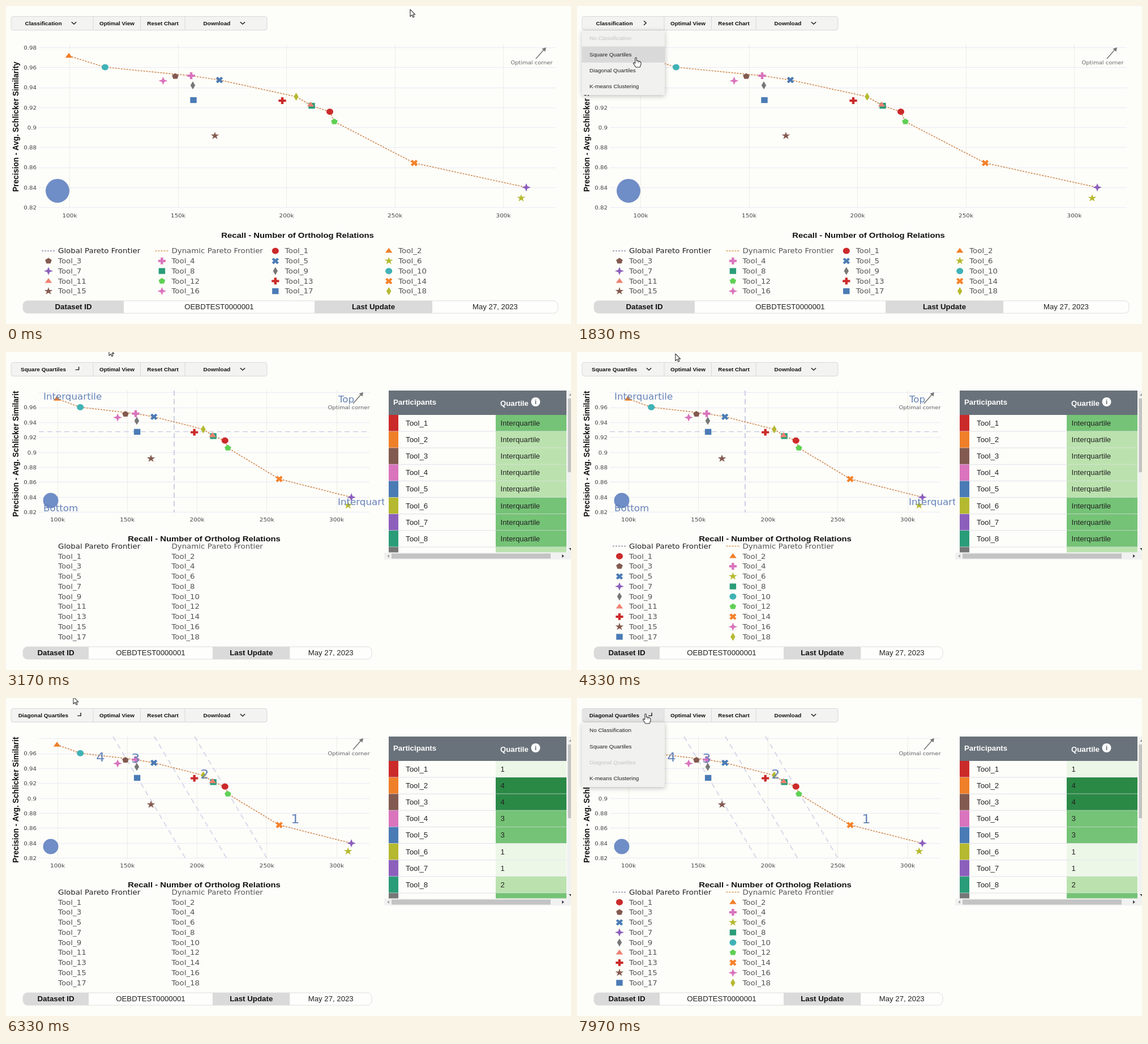
An HTML page with a canvas for the animation above (8 s loop, 998 px wide and 561 px high).

```html
<!DOCTYPE html>
<html lang="en">
<head>
<meta charset="utf-8">
<title>Benchmark chart classification</title>
<style>
html, body { margin: 0; width: 100%; height: 100%; overflow: hidden; background: #fdfdf9; }
canvas { display: block; width: 100vw; height: 100vh; }
</style>
</head>
<body>
<canvas id="stage" width="998" height="561"></canvas>
<script>
const ctx = document.getElementById('stage').getContext('2d');
const LOOP = 8000;
const PAGE = '#fdfdf9';
const ARIAL = '"Liberation Sans", Arial, sans-serif';
const VERDANA = '"DejaVu Sans", Verdana, sans-serif';
const LABEL_BLUE = '#6583b8';
const ASPECT = 0.905;

// Switch times: the page swaps layout when a new classification has loaded.
const MODES = [
  { start: 0, name: 'Classification', chevron: 120 },
  { start: 3070, name: 'Square Quartiles', chevron: 127 },
  { start: 6230, name: 'Diagonal Quartiles', chevron: 130.5 }
];
const MENU = ['No Classification', 'Square Quartiles', 'Diagonal Quartiles', 'K-means Clustering'];
const MENU_OPEN = [[1400, 3070], [4800, 6230], [7870, 9000]];
const CHEVRON_TURN = 200;
const LEGEND_DELAY = 180;

// time, x, y of the pointer tip
const POINTER = [
  [0, 714, 6], [100, 712, 7], [750, 320, 25], [1150, 122, 28], [1450, 121, 29], [1800, 104, 91],
  [2450, 104, 91], [2850, 150, 45], [3170, 182, -6], [3300, 183, -25], [4200, 177, -20],
  [4330, 174, 3], [4650, 123, 28], [4850, 121, 29], [5150, 91, 109], [5800, 92, 107],
  [6330, 119, -2], [6500, 122, -12], [7300, 122, -12], [7550, 124, 6], [7800, 121, 28], [8000, 121, 28]
];

// symbol, colour, x, y in the wide chart
const TOOLS = [
  ['circle', '#cb2a2a', 572, 186.5], ['triangle', '#ef7f28', 111, 88],
  ['pentagon', '#835a4f', 299, 124], ['plus', '#d974bd', 327, 123],
  ['cross', '#4a7bb5', 377, 130.5], ['star', '#b5b92f', 910, 339],
  ['spark', '#8c5fbc', 919, 320], ['square', '#2a9c78', 540, 176],
  ['diamond', '#777777', 330, 140], ['circle', '#40b2b6', 175, 108],
  ['triangle', '#ee8273', 538, 174], ['pentagon', '#5fd055', 580, 204],
  ['plus', '#cb2a2a', 488, 167], ['cross', '#f5822a', 721, 277],
  ['star', '#835a4f', 369, 229], ['spark', '#d974bd', 277.5, 132],
  ['square', '#4a7bb5', 331, 166], ['diamond', '#b5b92f', 512.5, 160]
];
const FRONTIER = [2, 10, 4, 5, 18, 8, 1, 12, 14, 7];

const WIDE = {
  x0: 112.5, dx: 191.5, y0: 73.5, dy: 35.25, right: 971, bottom: 355.5,
  tickY: 370, titleX: 515, titleY: 404, sideY: 213, arrow: [936, 93], logo: [91, 326, 21],
  columns: 4, legendY: 432, cells: [30, 208, 545, 753, 975]
};
const SPLIT = {
  x0: 91, dx: 123.25, y0: 71.6, dy: 26.4, right: 642, bottom: 283,
  tickY: 295.5, titleX: 350, titleY: 329, sideY: 176, arrow: [613, 91], logo: [79, 262, 13.5],
  columns: 2, legendY: 342.5, cells: [30, 146, 365, 501.5, 646]
};

const GREENS = ['', '#edf7e8', '#bbe2ae', '#75c376', '#2b8946'];
const SQUARE_SHADES = [3, 2, 2, 2, 2, 3, 3, 3, 2];
const DIAGONAL_QUARTILES = [1, 4, 4, 3, 3, 1, 1, 2, 3];

// Runs a drawing at x, y in the flattened coordinates, optionally rotated.
function flattened(x, y, angle, paint) {
  ctx.save();
  ctx.translate(x, y);
  ctx.scale(1, ASPECT);
  ctx.rotate(angle);
  paint();
  ctx.restore();
}

function text(s, x, y, size, color = '#222', family = ARIAL, align = 'left', weight = '', angle = 0) {
  ctx.font = `${weight} ${size}px ${family}`;
  ctx.textAlign = align;
  ctx.fillStyle = color;
  flattened(x, y, angle, () => ctx.fillText(s, 0, size * 0.36));
}
const bold = (s, x, y, size, color = '#111', align = 'center', angle = 0) =>
  text(s, x, y, size, color, ARIAL, align, 'bold', angle);

function rect(x, y, w, h, color) {
  ctx.fillStyle = color;
  ctx.fillRect(x, y, w, h);
}

function line(points, color, width = 1, dash = []) {
  ctx.beginPath();
  points.forEach(([x, y]) => ctx.lineTo(x, y));
  ctx.setLineDash(dash);
  ctx.strokeStyle = color;
  ctx.lineWidth = width;
  ctx.stroke();
  ctx.setLineDash([]);
}

function polygon(points, color) {
  ctx.beginPath();
  points.forEach(([x, y]) => ctx.lineTo(x, y));
  ctx.closePath();
  ctx.fillStyle = color;
  ctx.fill();
}

function disc(x, y, r, color) {
  ctx.beginPath();
  ctx.arc(x, y, r, 0, 7);
  ctx.fillStyle = color;
  ctx.fill();
}

// Corners on a circle starting at the top, alternating between the given radii.
const ring = (count, ...radii) => Array.from({ length: count }, (_, i) => {
  const a = i * 2 * Math.PI / count, r = radii[i % radii.length];
  return [r * Math.sin(a), -r * Math.cos(a)];
});
const PLUS = [[-2.2, -6.6], [2.2, -6.6], [2.2, -2.2], [6.6, -2.2], [6.6, 2.2], [2.2, 2.2],
  [2.2, 6.6], [-2.2, 6.6], [-2.2, 2.2], [-6.6, 2.2], [-6.6, -2.2], [-2.2, -2.2]];
const SHAPES = {
  circle: ring(40, 6),
  triangle: [[0, -5.8], [6.3, 3.6], [-6.3, 3.6]],
  pentagon: ring(5, 6.1),
  plus: PLUS,
  cross: PLUS.map(([x, y]) => [(x - y) * 0.707, (x + y) * 0.707]),
  star: ring(10, 7.8, 3),
  spark: ring(8, 8, 3.1),
  square: [[-5.7, -5.7], [5.7, -5.7], [5.7, 5.7], [-5.7, 5.7]],
  diamond: [[0, -7.8], [4.2, 0], [0, 7.8], [-4.2, 0]]
};

const marker = ([shape, color], x, y) => flattened(x, y, 0, () => polygon(SHAPES[shape], color));

const chevron = (x, y, turn) => flattened(x, y, turn * Math.PI / 2, () =>
  line([[-2, -4.2], [2.2, 0], [-2, 4.2]], '#222', 1.5));

const snap = v => Math.floor(v) + 0.5;

function drawChart(view, mode) {
  const place = ([, , x, y]) => [
    view.x0 + (x - WIDE.x0) * view.dx / WIDE.dx,
    view.y0 + (y - WIDE.y0) * view.dy / WIDE.dy
  ];
  for (let i = 0; i < 9; i++) {
    const y = view.y0 + i * view.dy;
    line([[58, snap(y)], [view.right, snap(y)]], '#e9e9f8');
    if (i || mode === 0) text(String((98 - 2 * i) / 100), 54, y, 10.2, '#444', VERDANA, 'right');
  }
  for (let i = 0; i < 5; i++) {
    const x = view.x0 + i * view.dx;
    line([[snap(x), 68], [snap(x), view.bottom]], '#e6e6df', 1, [2, 1]);
    text(`${100 + 50 * i}k`, x, view.tickY, 10.4, '#444', VERDANA, 'center');
  }
  disc(...view.logo, '#6f8dc6');

  const guide = '#cccfe6';
  if (mode === 1) {
    line([[297, 68], [297, 283]], guide, 2, [9, 6]);
    line([[58, 140.5], [642, 140.5]], guide, 1.6, [9, 6]);
  }
  if (mode === 2) {
    [189, 262, 333].forEach(x => line([[x, 68], [x + 128, 283]], guide, 1.5, [9, 7]));
  }

  line(FRONTIER.map(n => place(TOOLS[n - 1])), '#d08a52', 1.6, [3, 2]);
  TOOLS.forEach(tool => marker(tool, ...place(tool)));

  if (mode === 1) {
    ctx.save();
    ctx.beginPath();
    ctx.rect(0, 60, 668, 240);
    ctx.clip();
    [['Interquartile', 66, 78.5], ['Top', 587, 83.5], ['Bottom', 66, 275.5], ['Interquartile', 586, 265]]
      .forEach(([s, x, y]) => text(s, x, y, 16.7, LABEL_BLUE, VERDANA));
    ctx.restore();
  }
  if (mode === 2) {
    [['4', 167, 104.5], ['3', 229, 106.5], ['2', 351, 134.5], ['1', 511, 213]]
      .forEach(([s, x, y]) => text(s, x, y, 24, LABEL_BLUE, VERDANA, 'center'));
  }

  const [ax, ay] = view.arrow;
  line([[ax, ay], [ax + 15, ay - 17]], '#777', 1.6);
  polygon([[ax + 18, ay - 20], [ax + 16.5, ay - 12.5], [ax + 10.5, ay - 17.5]], '#777');
  text('Optimal corner', ax - 7.5, ay + 6.5, 9.9, '#666', VERDANA, 'center');

  bold('Recall - Number of Ortholog Relations', view.titleX, view.titleY, 14.9);
  ctx.save();
  ctx.beginPath();
  ctx.rect(0, 68, 40, 300);
  ctx.clip();
  bold('Precision - Avg. Schlicker Similarity', 17, view.sideY, 14.9, '#111', 'center', -Math.PI / 2);
  ctx.restore();
}

function drawLegend(view, withSymbols) {
  const entries = ['Global Pareto Frontier', 'Dynamic Pareto Frontier', ...TOOLS];
  entries.forEach((entry, i) => {
    const x = 75 + (i % view.columns) * 200.4;
    const y = view.legendY + Math.floor(i / view.columns) * 17.77;
    const isLine = i < 2;
    text(isLine ? entry : `Tool_${i - 1}`, x + 17, y, 13.4, i ? '#555' : '#222', VERDANA);
    if (!withSymbols) return;
    if (isLine) line([[x - 12, y], [x + 11, y]], i ? '#d99a55' : '#8f8cab', 1.4, [3, 2]);
    else marker(entry, x, y);
  });
}

function drawInfoBar({ cells }) {
  const labels = ['Dataset ID', 'OEBDTEST0000001', 'Last Update', 'May 27, 2023'];
  const left = cells[0], width = cells[4] - left;
  ctx.save();
  ctx.beginPath();
  ctx.roundRect(left, 520, width, 22, 8);
  ctx.clip();
  labels.forEach((label, i) => {
    const head = i % 2 === 0, mid = (cells[i] + cells[i + 1]) / 2;
    rect(cells[i], 520, cells[i + 1] - cells[i], 22, head ? '#dadada' : '#fefefd');
    if (head) bold(label, mid, 530.5, 13.3);
    else text(label, mid, 530.5, 13.2, '#222', ARIAL, 'center');
  });
  ctx.restore();
  ctx.beginPath();
  ctx.roundRect(left, 520, width, 22, 8);
  ctx.strokeStyle = '#dedede';
  ctx.lineWidth = 1;
  ctx.stroke();
}

function drawTable(mode) {
  ctx.save();
  ctx.beginPath();
  ctx.rect(668, 60, 330, 293.5);
  ctx.clip();
  rect(676, 68, 314, 43, '#69727a');
  bold('Participants', 684, 89, 13.3, '#fff', 'left');
  bold('Quartile', 873, 91, 13.2, '#fff', 'left');
  disc(935.5, 88, 8, '#fff');
  bold('i', 935.5, 88, 13, '#69727a');
  for (let i = 0; i < 9; i++) {
    const y = 111 + i * 29.15, mid = y + 14.5;
    const shade = mode === 1 ? SQUARE_SHADES[i] : DIAGONAL_QUARTILES[i];
    rect(676, y, 17, 29.2, TOOLS[i][1]);
    rect(865, y, 125, 29.2, GREENS[shade]);
    line([[676, y + 29], [990, y + 29]], '#dfe0ea');
    text(`Tool_${i + 1}`, 706, mid, 13.3);
    text(mode === 1 ? 'Interquartile' : String(shade), 873.5, mid, 13.2);
  }
  ctx.restore();

  rect(991, 68, 7, 286, '#f1f1f1');
  rect(992.5, 82, 5.5, 130, '#c3c3c3');
  polygon([[994, 77], [998, 73], [998, 77]], '#999');
  polygon([[994, 346], [998, 346], [998, 350]], '#444');
  rect(668, 354, 330, 12, '#f1f1f1');
  rect(681, 355.5, 281, 9, '#c3c3c3');
  polygon([[677, 357], [677, 363], [673, 360]], '#aaa');
  polygon([[982, 357], [982, 363], [986, 360]], '#444');
}

function drawToolbar(mode, open, hovered) {
  ctx.beginPath();
  ctx.roundRect(9, 18.5, 452, 24, 4);
  ctx.fillStyle = '#f3f3f2';
  ctx.fill();
  if (hovered) rect(10, 19, 144, 23, '#e5e5e5');
  ctx.beginPath();
  ctx.roundRect(9, 18.5, 452, 24, 4);
  ctx.strokeStyle = '#d8d8dc';
  ctx.lineWidth = 1;
  ctx.stroke();
  [154, 237.5, 316].forEach(x => line([[x, 19], [x, 42]], '#d8d8dc'));
  bold(MODES[mode].name, 66, 30.5, 10);
  bold('Optimal View', 196, 30.5, 9.9);
  bold('Reset Chart', 277, 30.5, 9.9);
  bold('Download', 372.5, 30.5, 10);
  chevron(MODES[mode].chevron, 30, 1 - open);
  chevron(418, 30, 1);
}

function drawMenu(mode, [px, py]) {
  ctx.save();
  ctx.shadowColor = 'rgba(0,0,0,.25)';
  ctx.shadowBlur = 8;
  ctx.shadowOffsetY = 2;
  rect(8.5, 43, 146.5, 114, '#f1f1f0');
  ctx.restore();
  MENU.forEach((item, i) => {
    const y = 43 + i * 28.4, disabled = i === mode;
    const hover = px > 8 && px < 155 && py >= y && py < y + 28.4;
    if (hover && !disabled) rect(8.5, y, 146.5, 28.4, '#d9d9d9');
    text(item, 22, y + 14, 9.95, disabled ? '#c4c4c4' : '#222');
  });
}

function pointerAt(t) {
  const i = POINTER.findIndex((p, n) => n && t <= p[0]);
  const [t0, x0, y0] = POINTER[i - 1], [t1, x1, y1] = POINTER[i];
  const u = (t - t0) / (t1 - t0);
  return [x0 + (x1 - x0) * u, y0 + (y1 - y0) * u];
}

const ARROW = new Path2D('M0 0V12.5L3 9.8L5 14L7 13L5 9H8.8Z');
const HAND = new Path2D('M-1.2 1Q0-1 1.3 1V6Q3.5 5 4.2 6.6Q6 5.8 6.8 7.4Q8.5 7 9 8.8V12L7 17H0L-4.5 10.5Q-4.5 8-1.2 10Z');
function drawPointer([x, y], hand) {
  ctx.save();
  ctx.translate(x, y);
  ctx.fillStyle = '#fff';
  ctx.strokeStyle = '#333';
  ctx.lineWidth = 1.1;
  ctx.lineJoin = 'round';
  ctx.fill(hand ? HAND : ARROW);
  ctx.stroke(hand ? HAND : ARROW);
  if (hand) line([[4.2, 7], [4.2, 10]], '#555', 0.8);
  ctx.restore();
}

const clamp = v => Math.max(0, Math.min(1, v));

function draw(t) {
  const mode = MODES.filter(m => t >= m.start).length - 1;
  const view = mode ? SPLIT : WIDE;
  const pointer = pointerAt(t), [px, py] = pointer;
  const menuOpen = MENU_OPEN.some(([a, b]) => t >= a && t < b);
  const chevronOpen = MENU_OPEN.reduce((sum, [a, b]) =>
    sum + clamp((t - a) / CHEVRON_TURN) - clamp((t - b) / CHEVRON_TURN), 0);
  const onBar = py > 18 && py < 43 && px > 9 && px < 461;
  const onMenu = menuOpen && py >= 43 && py < 157 && px > 8 && px < 155;

  rect(0, 0, 998, 561, PAGE);
  drawChart(view, mode);
  drawLegend(view, !mode || t >= MODES[mode].start + LEGEND_DELAY);
  drawInfoBar(view);
  if (mode) drawTable(mode);
  drawToolbar(mode, chevronOpen, onBar && px < 154);
  if (menuOpen) drawMenu(mode, pointer);
  drawPointer(pointer, onBar || onMenu);
}

function tick() {
  draw(performance.now() % LOOP);
  requestAnimationFrame(tick);
}
tick();
</script>
</body>
</html>
```
